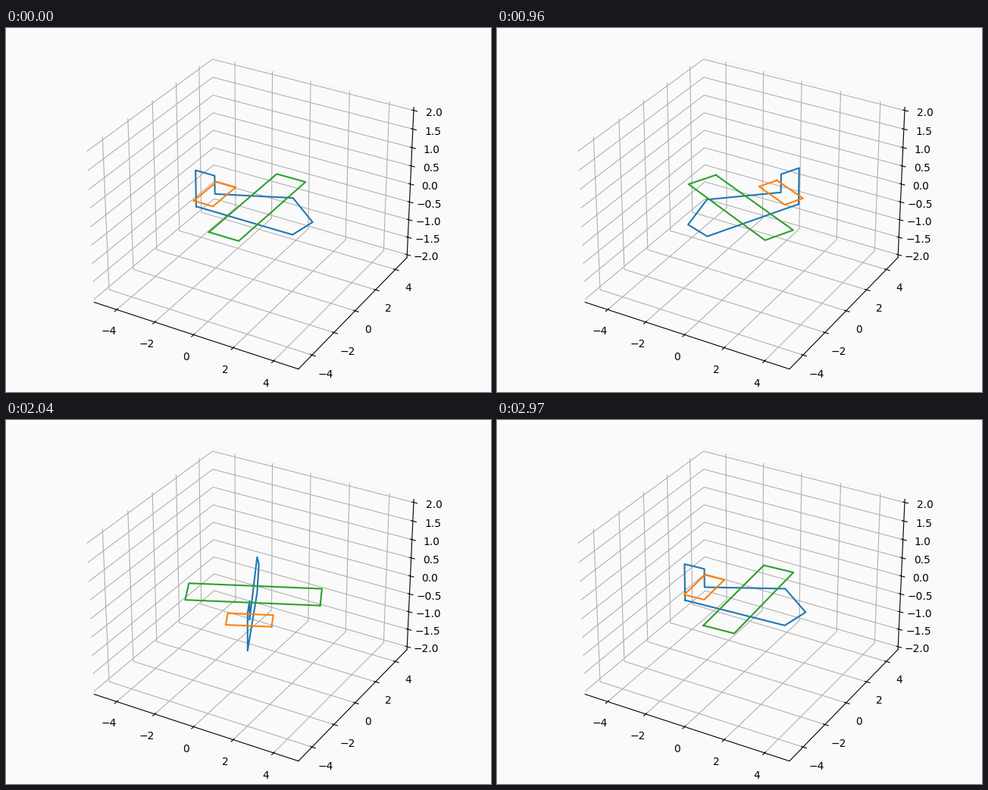
A matplotlib script for the animation above (3000 ms loop, 640x480 px).

```python
import numpy as np
import matplotlib.pyplot as plt
from matplotlib.animation import FuncAnimation

FRAMES = 100
INTERVAL = 30
BG = "#fafafa"
MARGIN = 25 / 24


def rect(x0, x1, y):
    """Flat rectangle at z = 0, symmetric about the x axis."""
    return np.array([(x0, -y, 0), (x1, -y, 0), (x1, y, 0), (x0, y, 0), (x0, -y, 0)], float)


profile = [(-3, -.5), (2, -.5), (3, 0), (2, .5), (-2, 0), (-2, .5), (-3, .5), (-3, -.5)]
body = np.array([(x, 0, z) for x, z in profile])
tail = rect(-2.5, -1.5, 1)
wing = rect(-.5, 1, 3)
parts = [body, tail, wing]

fig = plt.figure(figsize=(6.4, 4.8), dpi=100, facecolor=BG)
ax = fig.add_axes([0, 0, 1, 1], projection="3d", facecolor=BG)
ax.view_init(elev=30, azim=-60)

lines = [ax.plot(*p.T, color=f"C{i}", lw=1.5)[0] for i, p in enumerate(parts)]

ax.set_xlim(-5 * MARGIN, 5 * MARGIN)
ax.set_ylim(-5 * MARGIN, 5 * MARGIN)
ax.set_zlim(-2 * MARGIN, 2 * MARGIN)
ax.set_xticks(range(-4, 5, 2))
ax.set_yticks(range(-4, 5, 2))
ax.set_zticks(np.arange(-2, 2.1, .5))

for axis, edge in ((ax.xaxis, BG), (ax.yaxis, "#f0f0f0"), (ax.zaxis, "none")):
    axis.pane.set_fill(False)
    axis.pane.set_edgecolor(edge)


def update(i):
    a = -2 * np.pi * i / FRAMES
    c, s = np.cos(a), np.sin(a)
    for line, (x, y, z) in zip(lines, (p.T for p in parts)):
        line.set_data_3d(c * x - s * y, s * x + c * y, z)
    return lines


anim = FuncAnimation(fig, update, frames=FRAMES, interval=INTERVAL,
                     repeat=True, repeat_delay=0, blit=False)
plt.show()
```
